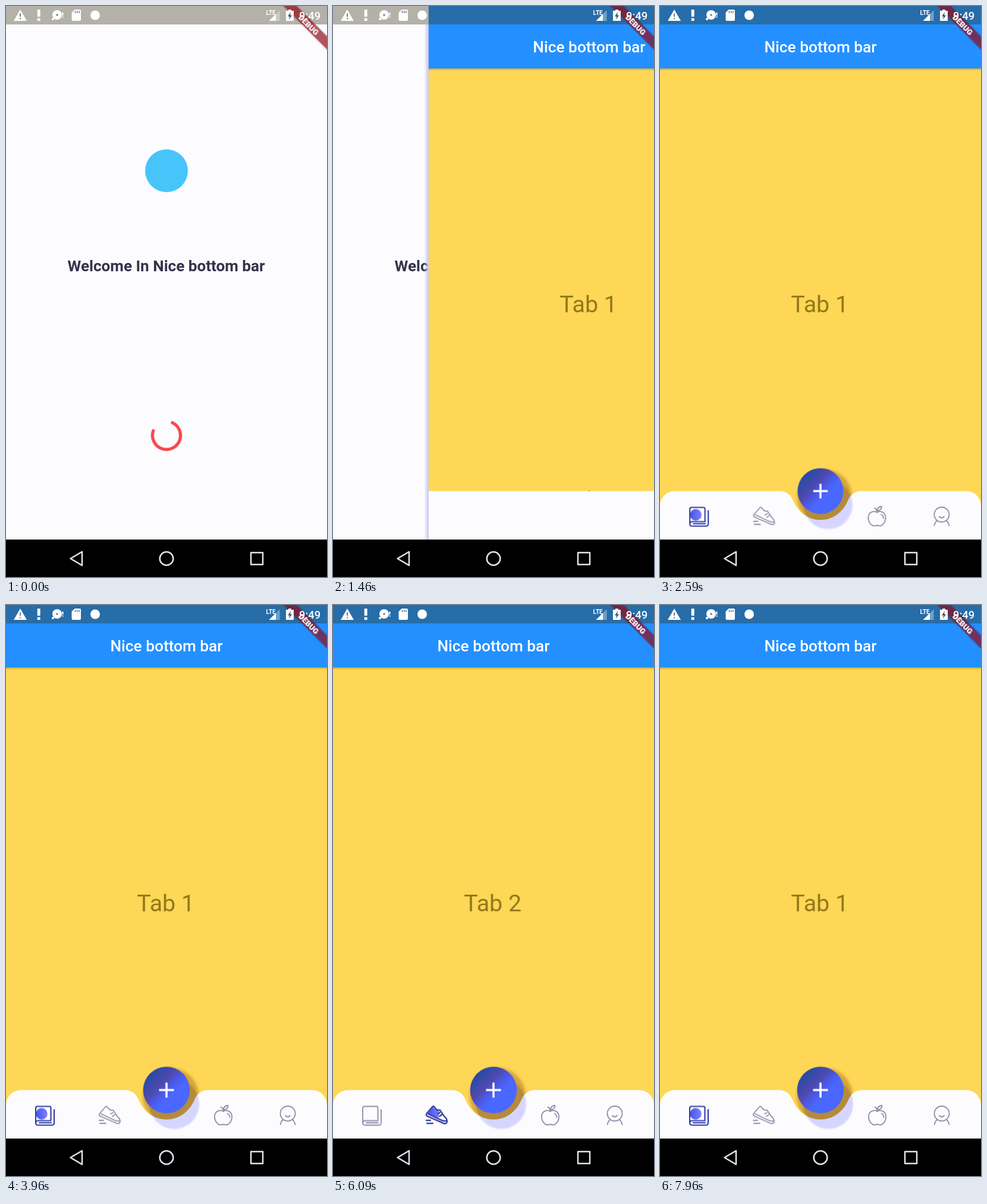
Recreate the animation shown at these times as an HTML page. Size 540 by 960 pixels, loop 8 s.

```html
<!DOCTYPE html>
<html lang="en">
<head>
<meta charset="utf-8">
<title>Nice bottom bar</title>
<style>
  html, body { margin: 0; height: 100%; overflow: hidden; background: #fcfcff; }
  svg { display: block; width: 100%; height: 100%; font-family: Roboto, sans-serif; }

  .page, .bar, .grow, .spread, .icons, .first, .second,
  .hole, .pop, .dot, .arc, .spin { animation: 8s linear infinite; }
  .page { animation-name: slide; }
  .bar { animation-name: notch; }
  .grow { animation-name: grow; }
  .spread { animation-name: spread; }
  .icons { animation-name: appear; animation-timing-function: step-end; }
  .first { animation-name: first; animation-timing-function: step-end; }
  .second { animation-name: second; animation-timing-function: step-end; }
  .arc { animation-name: dash; }
  .spin { animation-name: spin; }

  /* tap effects start at 0% of their own clock, shifted to each tap */
  .hole { animation-name: hole; }
  .pop { animation-name: pop; }
  .dot { animation-name: dot; }
  .book * { animation-delay: -1.65s; }
  .shoe * { animation-delay: -2.75s; }
  .book .first, .shoe .second { animation-delay: 0s; }

  .line { fill: none; stroke-linecap: round; stroke-linejoin: round; }
  .gray { stroke: #8f8ba6; stroke-width: 1.8; }
  .blue { stroke: #2d38a2; stroke-width: 2.1; }
  .dot { fill: #2f30a8; }

  @keyframes slide {
    0% { transform: translateX(560px); animation-timing-function: step-end; }
    15.63% { transform: translateX(540px); }
    19.38%, 100% { transform: translateX(0px); }
  }
  @keyframes notch {
    0%, 18.125% {
      d: path("M0 897V815.5C0 815.5 0 815.5 0 815.5H270C270 815.5 270 815.5 270 815.5C270 815.5 270 815.5 270 815.5C270 815.5 270 815.5 270 815.5C270 815.5 270 815.5 270 815.5H540C540 815.5 540 815.5 540 815.5V897Z");
      animation-timing-function: cubic-bezier(.333, .667, .667, 1);
    }
    34.75%, 100% {
      d: path("M0 897V841C0 827 11 815.5 25 815.5H200C212 815.5 219 822 224 834C233 853 250 865 270 865C290 865 307 853 316 834C321 822 328 815.5 340 815.5H515C529 815.5 540 827 540 841V897Z");
    }
  }
  @keyframes grow {
    0%, 18.125% { transform: scale(0); animation-timing-function: cubic-bezier(.333, .667, .667, 1); }
    34.75%, 100% { transform: scale(1); }
  }
  @keyframes spread {
    0%, 18.125% { transform: translateX(var(--d)); animation-timing-function: cubic-bezier(.333, .667, .667, 1); }
    34.75%, 100% { transform: translateX(0px); }
  }
  @keyframes appear { 0% { opacity: 0; } 19.25%, 100% { opacity: 1; } }
  @keyframes first { 0% { opacity: 1; } 65.625% { opacity: 0; } 79.375%, 100% { opacity: 1; } }
  @keyframes second { 0% { opacity: 0; } 65.625% { opacity: 1; } 79.375%, 100% { opacity: 0; } }
  @keyframes hole { 0% { r: 28px; } 4.25%, 100% { r: 0px; } }
  @keyframes pop {
    0%, 3.5% { transform: scale(1); }
    5% { transform: scale(1.13); }
    8%, 100% { transform: scale(1); }
  }
  @keyframes dot {
    0%, 3.5% { transform: scale(0); }
    5% { transform: translate(var(--x), var(--y)) scale(1); }
    8%, 100% { transform: translate(var(--x), var(--y)) scale(0); }
  }
  @keyframes dash {
    0% { stroke-dasharray: 276 84; stroke-dashoffset: 0; animation-timing-function: cubic-bezier(.4, 0, .2, 1); }
    8.33% { stroke-dasharray: 2 358; stroke-dashoffset: -270; animation-timing-function: cubic-bezier(.4, 0, .2, 1); }
    16.66% { stroke-dasharray: 276 84; stroke-dashoffset: -270; animation-timing-function: cubic-bezier(.4, 0, .2, 1); }
    25%, 100% { stroke-dasharray: 2 358; stroke-dashoffset: -540; }
  }
  @keyframes spin { from { transform: rotate(-71deg); } to { transform: rotate(1765deg); } }
</style>
</head>
<body>
<svg viewBox="0 0 540 960">
  <defs>
    <linearGradient id="fab" x1=".12" y1=".12" x2=".88" y2=".88">
      <stop offset="0" stop-color="#204aa6"/>
      <stop offset=".34" stop-color="#4e4aae"/>
      <stop offset=".52" stop-color="#4b5cf0"/>
      <stop offset=".64" stop-color="#4a68ff"/>
    </linearGradient>
    <linearGradient id="ball">
      <stop offset="0" stop-color="#4656e4"/>
      <stop offset="1" stop-color="#7d7dff"/>
    </linearGradient>
    <linearGradient id="edge">
      <stop offset="0" stop-color="#c9c9ff" stop-opacity="0"/>
      <stop offset="1" stop-color="#c3c3ee"/>
    </linearGradient>
    <linearGradient id="drop" x2="0" y2="1">
      <stop offset="0" stop-opacity=".22"/>
      <stop offset="1" stop-opacity="0"/>
    </linearGradient>
    <filter id="soft"><feGaussianBlur stdDeviation="2"/></filter>
    <filter id="haze"><feGaussianBlur stdDeviation="1"/></filter>

    <path id="book" d="M10.5 8.5V-13q0-2.5-2.5-2.5H-12q-3 0-3 3V12q0 4 4 4H12q4 0 4-4V-10M10.5 8.5H-11q-4 0-4 3.7M-9 12H11"/>
    <path id="shoe" d="M-16.5-3.5L-7-14.5Q-5-17-3-14Q1-8 6-9.5L13 1Q18 5 18 10Q17 15 11 12.5L-15 1Q-18.5-1-16.5-3.5ZM-14-3L8 7.5Q13 10 17.5 8.5M2-3L6-5M5 1L9-1.5M-17 8H-10M-16 13H-6"/>
    <path id="apple" d="M0-7C-4-10-14-9-14.5 1C-15 10-8 16.5-4 15.5Q0 14 4 15.5C8 16.5 15 10 14.5 1C14-9 4-10 0-7ZM0-7Q0-12-4-14.5M0-10Q1-17 8-17Q8-10 0-10M7-3.5Q11-2 11 3"/>
    <path id="person" d="M-12.5-3.5a12.5 12.5 0 0 1 25 0a12.5 12.5 0 0 1-25 0M-4 0Q0 4 4 0M-12.5 15Q-11 9-7.5 6.5M12.5 15Q11 9 7.5 6.5"/>
  </defs>

  <!-- splash -->
  <rect width="540" height="960" fill="#fcfcff"/>
  <rect width="540" height="31" fill="#b3b1a8"/>
  <circle cx="270" cy="277" r="36" fill="#47c5fb"/>
  <text x="269.5" y="446" text-anchor="middle" font-size="26.1" font-weight="700" fill="#33334d">Welcome In Nice bottom bar</text>
  <g transform="translate(270 722)">
    <g class="spin"><circle class="arc" r="23.6" pathLength="360" fill="none" stroke="#f4494e" stroke-width="5.2"/></g>
  </g>

  <!-- home page -->
  <g class="page">
    <rect x="-8" y="31" width="8" height="866" fill="url(#edge)"/>
    <rect width="540" height="897" fill="#fdd755"/>
    <rect y="105" width="540" height="4" fill="url(#drop)"/>
    <rect width="540" height="105" fill="#2490ff"/>
    <rect width="540" height="31" fill="#266da9"/>
    <text x="270" y="78" text-anchor="middle" font-size="26.25" font-weight="500" fill="#fff">Nice bottom bar</text>
    <g font-size="39.4" fill="#94781b" text-anchor="middle">
      <text class="first" x="268.7" y="515">Tab 1</text>
      <text class="second" x="268.7" y="515">Tab 2</text>
    </g>

    <g transform="translate(270 815.5)"><g class="grow">
      <circle cx="7" cy="10" r="47" fill="#d6a43a" filter="url(#soft)"/>
    </g></g>
    <path class="bar" fill="#fcfcff" d="M0 897V815.5H540V897Z"/>
    <g transform="translate(270 815.5)" style="mix-blend-mode:multiply"><g class="grow">
      <circle cx="13" cy="23.5" r="42" fill="#d8d8ff" filter="url(#haze)"/>
    </g></g>

    <g class="icons line">
      <g class="spread" style="--d:10px"><g class="book" transform="translate(65 858.5)">
        <circle class="dot" r="5" style="--x:3.5px;--y:-27px"/>
        <circle class="dot" r="2.6" style="--x:-27.5px;--y:-4.5px"/>
        <circle class="dot" r="4" style="--x:23px;--y:4.5px"/>
        <g class="pop">
          <use href="#book" class="gray"/>
          <g class="first">
            <rect x="-18" y="-18" width="36" height="36" fill="#fcfcff"/>
            <circle cx="-5" cy="-3" r="9.7" fill="url(#ball)"/>
            <use href="#book" class="blue"/>
            <clipPath id="bookHole"><circle class="hole" cx="10" cy="5" r="0"/></clipPath>
            <g clip-path="url(#bookHole)">
              <rect x="-18" y="-18" width="36" height="36" fill="#fcfcff"/>
              <use href="#book" class="gray"/>
            </g>
            <circle class="hole" cx="10" cy="5" r="0" stroke="#d2d0f2" stroke-width="1.5"/>
          </g>
        </g>
      </g></g>

      <g class="spread" style="--d:30.5px"><g class="shoe" transform="translate(174 858.5)">
        <circle class="dot" r="5" style="--x:3.5px;--y:-27px"/>
        <circle class="dot" r="2.6" style="--x:-27.5px;--y:-4.5px"/>
        <circle class="dot" r="4" style="--x:23px;--y:4.5px"/>
        <g class="pop">
          <use href="#shoe" class="gray"/>
          <g class="second">
            <path d="M-15-3L-6-14.5Q0-8 5-8L3 4Z" fill="url(#ball)"/>
            <use href="#shoe" class="blue"/>
            <clipPath id="shoeHole"><circle class="hole" cx="10" cy="5" r="0"/></clipPath>
            <g clip-path="url(#shoeHole)">
              <rect x="-20" y="-20" width="46" height="41" fill="#fcfcff"/>
              <use href="#shoe" class="gray"/>
            </g>
            <circle class="hole" cx="10" cy="5" r="0" stroke="#d2d0f2" stroke-width="1.5"/>
          </g>
        </g>
      </g></g>

      <g class="spread" style="--d:-30.5px"><use href="#apple" class="gray" transform="translate(365.5 858.5)"/></g>
      <g class="spread" style="--d:-10px"><use href="#person" class="gray" transform="translate(474 858.5)"/></g>
    </g>

    <g transform="translate(270 815.5)"><g class="grow">
      <circle r="39.3" fill="url(#fab)"/>
      <path d="M-12.5 0H12.5M0-12.5V12.5" stroke="#fff" stroke-width="3.6"/>
    </g></g>
  </g>

  <!-- debug ribbon -->
  <g transform="translate(509.5 31.5) rotate(45)">
    <rect x="-80" y="-8" width="160" height="16" opacity=".2" filter="url(#soft)"/>
    <rect x="-80" y="-7.8" width="160" height="15.6" fill="#a00a1c" opacity=".62"/>
    <text y="4.7" text-anchor="middle" font-size="13.2" font-weight="900" fill="#fff">DEBUG</text>
  </g>

  <!-- status bar -->
  <g fill="#fff">
    <path d="M24 6L35 25H13Z"/>
    <path d="M24 12.5V18M24 20V22.3" stroke="#777d84" stroke-width="2"/>
    <path d="M52.7 6H57.6V18H52.7ZM52.7 20.5H57.6V25H52.7Z"/>
    <circle cx="86" cy="15" r="8"/>
    <circle cx="79" cy="22" r="2"/>
    <path d="M94.5 11H96.5V16H94.5ZM94.5 17.5H96.5V19.5H94.5Z"/>
    <circle cx="86" cy="15" r="1.7" fill="#5f7d98"/>
    <path d="M115.5 6H124Q126 6 126 8V23Q126 25 124 25H112.5Q110.5 25 110.5 23V11Z"/>
    <path d="M116.5 8V12M119.7 8V12M123 8V12" stroke="#777d84" stroke-width="1.5"/>
    <circle cx="150" cy="15.5" r="8"/>
    <text x="437.5" y="14.5" font-size="10" font-weight="700">LTE</text>
    <path d="M460.5 7V25H442.5Z" opacity=".35"/>
    <path d="M454 13.5V25H442.5Z"/>
    <path d="M475 6H480V8H484V25H471V8H475Z"/>
    <path d="M479 10L474 17.5H477L476 23L481 15.5H478Z" fill="#41546c"/>
    <text x="493" y="23" font-size="18.4" font-weight="500">9:49</text>
  </g>

  <!-- navigation bar -->
  <rect y="897" width="540" height="63"/>
  <g fill="none" stroke="#e5e2ec" stroke-width="2.5" stroke-linejoin="round">
    <path d="M108.5 929L128 917.5V940.5Z"/>
    <circle cx="270" cy="929" r="11.3"/>
    <rect x="412" y="919" width="20" height="20"/>
  </g>
</svg>
</body>
</html>
```
